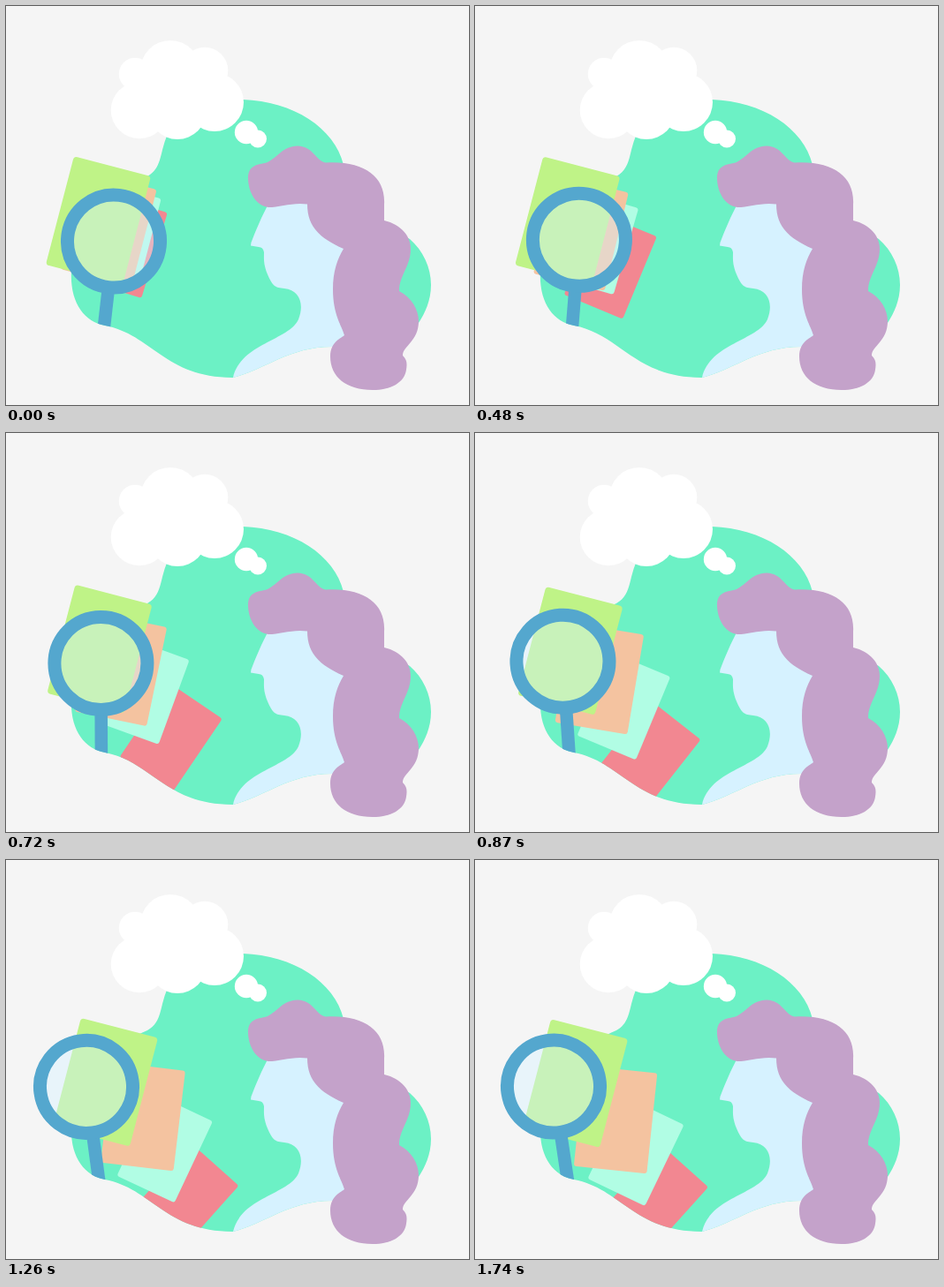
Write an HTML page that moves like this. It is 524 px wide and 452 px high and loops after 1770 ms.

```html
<!DOCTYPE html>
<html lang="en">
<head>
<meta charset="utf-8">
<title>Thinking and searching</title>
<style>
html, body { margin: 0; width: 100%; height: 100%; overflow: hidden; background: #f5f5f5; }
svg { display: block; width: 524px; height: 452px; }
</style>
</head>
<body>
<svg viewBox="0 0 524 452">
  <defs>
    <path id="blob" d="M257 421C295 411 322 385 372 386C400 390 450 385 467 359C474 348 481 334 481 316C481 296 472 277 457 264L400 230L382 180C372 138 325 108 268 106C225 103 190 120 181 150C174 168 176 184 160 193C110 215 80 250 74 300C72 335 88 358 112 362C165 372 180 421 257 421Z"/>
    <clipPath id="ground"><path d="M0 0H524V330H0Z"/><use href="#blob"/></clipPath>
  </defs>
  <use href="#blob" fill="#6cf1c5"/>
  <g fill="#fff">
    <circle cx="151" cy="118" r="32.3"/>
    <circle cx="146" cy="77" r="18.3"/>
    <circle cx="186" cy="73" r="34"/>
    <circle cx="225" cy="73" r="26.3"/>
    <circle cx="236" cy="109" r="33"/>
    <circle cx="194" cy="118" r="33"/>
    <path d="M150 80H225V115H150Z"/>
    <circle cx="272" cy="143" r="13.2"/>
    <circle cx="285" cy="150.5" r="10"/>
  </g>
  <path fill="#d6f2ff" d="M257 421C266 382 320 379 331 355C338 337 332 322 315 320C305 319 302 318 296 304C291 292 292 285 292 279Q291 273 286 273L277 271.5Q277 268 279 264Q287 243 296 226L345 220L400 300L385 386H372C322 385 295 411 257 421Z"/>
  <path fill="#c4a2ca" d="M274 197C273 178 288 180 296 177C308 171 313 159 330 158.5C348 159 351 176 362 177.5C405 175 430 193 428 225V243C446 247 458 260 458 275C458 295 445 305 445 323C459 330 467 344 467 357C467 380 449 385 449 396C454 401 454 405 453 412C451 427 435 435 415 435C385 435 367 420 367 397C367 380 380 376 383 373C380 362 370 350 370 321C370 300 375 287 382 275C355 263 341 250 341 224.5C325 222 310 228 297 228C283 226 275 212 274 197Z"/>
  <g clip-path="url(#ground)">
    <rect id="pink" x="-36" y="-50.5" width="72" height="101" rx="3" fill="#f28791"/>
    <rect id="mint" x="-36" y="-51" width="72" height="102" rx="3" fill="#b1fde4"/>
    <rect id="orange" x="-41.5" y="-57.2" width="83" height="114.4" rx="3" fill="#f4c3a0"/>
    <rect id="lime" x="-45" y="-63.5" width="90" height="127" rx="4" fill="#bff387"/>
    <g id="glass" stroke="#54a7ce">
      <path d="M0 52V135" stroke-width="14.5"/>
      <circle r="52.5" fill="#d4f0ff" fill-opacity=".42" stroke-width="15"/>
    </g>
  </g>
</svg>
<script>
const LOOP = 1770, STEP = 30;

// from / to: centre x, centre y, angle in degrees
const parts = [
  { id: "pink",   from: [133.6, 272, 17],    to: [203.5, 384, 42],    delay: 0,   time: 1450 },
  { id: "mint",   from: [128, 258.6, 14.6],  to: [182, 330.5, 25.7],  delay: 0,   time: 1690 },
  { id: "orange", from: [116, 253, 14.6],    to: [159.2, 294.2, 6],   delay: 20,  time: 1850 },
  { id: "lime",   from: [104.5, 243, 14.6],  to: [113.6, 253, 14.6],  delay: 228, time: 1650 },
  { id: "glass",  from: [122, 266.5, 6.5],   to: [89, 256.5, -8.5],   delay: 0,   time: 1740 }
];
for (const p of parts) p.el = document.getElementById(p.id);

// cubic-bezier(.59, 0, .22, 1)
function ease(x) {
  if (x <= 0) return 0;
  if (x >= 1) return 1;
  let lo = 0, hi = 1, s;
  for (let i = 0; i < 24; i++) {
    s = (lo + hi) / 2;
    const r = 1 - s;
    if (3 * s * r * r * .59 + 3 * s * s * r * .22 + s ** 3 < x) lo = s; else hi = s;
  }
  return s * s * (3 - 2 * s);
}

// Moves along a shallow arc whose bend follows the turn
function pose({ el, from, to, delay, time }, t) {
  const k = ease((t - delay) / time);
  const [dx, dy, turn] = to.map((v, i) => v - from[i]);
  const bow = turn * Math.PI / 360 * k * (1 - k);
  const x = from[0] + dx * k + dy * bow;
  const y = from[1] + dy * k - dx * bow;
  el.setAttribute("transform", `translate(${x} ${y}) rotate(${from[2] + turn * k})`);
}

const start = performance.now();
function draw(now) {
  const t = Math.max(0, now - start) % LOOP;
  for (const p of parts) pose(p, t - t % STEP);
  requestAnimationFrame(draw);
}
draw(start);
</script>
</body>
</html>
```
